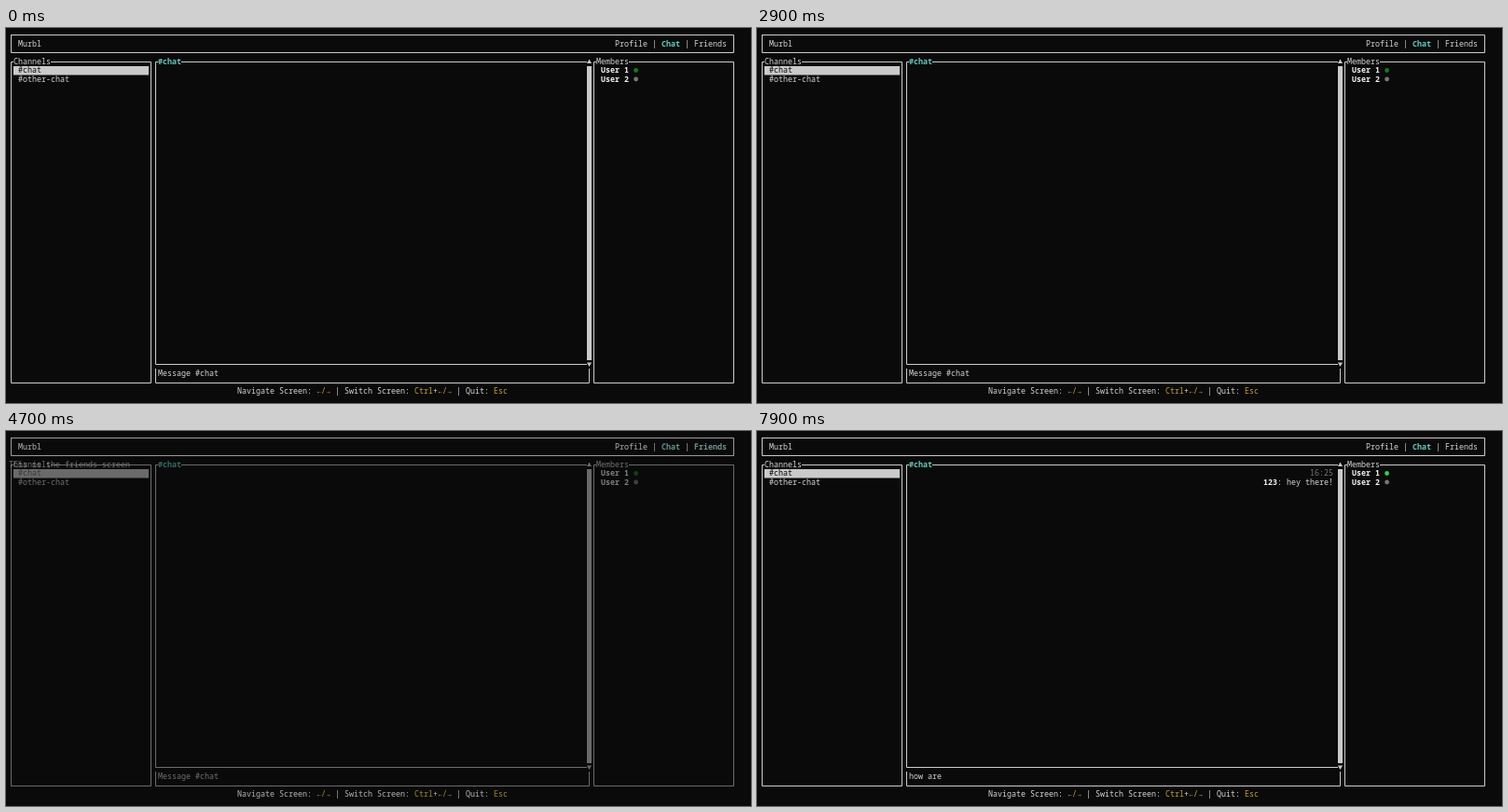
Recreate the animation shown at these times as an HTML page with a canvas. Size 799 by 403 pixels, loop 8 s.

```html
<!DOCTYPE html>
<html lang="en">
<head>
<meta charset="utf-8">
<title>Terminal chat</title>
<style>
  html, body { margin: 0; width: 100%; height: 100%; overflow: hidden; background: #0a0a0a; }
  canvas { display: block; }
</style>
</head>
<body>
<canvas id="stage" width="799" height="403"></canvas>
<script>
const ctx = document.getElementById('stage').getContext('2d');
const LOOP = 8000, CELL = 5, ROW = 9.585;
const BG = '#0a0a0a', FG = '#d6d6d6', LINE = '#cccccc', TEAL = '#68c9c0',
      GOLD = '#c4a044', GRAY = '#767676', WHITE = '#f2f2f2';

// Screen changes: [start, screen]
const screens = [[0, 'Chat'], [2000, 'Profile'], [2900, 'Chat'], [3800, 'Friends'], [4700, 'Chat']];
// Moments where the old and new picture mix for 100 ms
const mixes = [2000, 4700, 6400];
// Typing: text, start, end, characters present after each 100 ms step
const typing = [
  { text: 'hey there!', from: 5500, to: 6400, counts: [1, 3, 5, 6, 8, 9, 10] },
  { text: 'how are', from: 7500, to: LOOP, counts: [1, 3, 4, 5, 7] }
];
// Spans in which the online dot is bright
const bright = [[500, 2000], [3300, 3800], [5300, LOOP]];

function text(str, x, row, color = FG, bold = false) {
  ctx.font = `${bold ? 700 : 400} 8.333px "Noto Sans Mono", "DejaVu Sans Mono", monospace`;
  ctx.fillStyle = color;
  ctx.fillText(str, x, 19.5 + (row - 1) * ROW);
  return x + str.length * CELL;
}

function rect(x, y, w, h, color = LINE) {
  ctx.fillStyle = color;
  ctx.fillRect(x, y, w, h);
}

function path(points, close) {
  ctx.beginPath();
  points.forEach(([x, y]) => ctx.lineTo(x, y));
  if (close) {
    ctx.fillStyle = LINE;
    ctx.fill();
  } else {
    ctx.strokeStyle = LINE;
    ctx.lineWidth = 1;
    ctx.stroke();
  }
}

// Panel outline with a title set into its top edge
function panel(x, right, bottom, title, color, bold) {
  const gap = x + 2.5, end = gap + title.length * CELL;
  path([[gap, 36.5], [x, 36.5], [x, bottom], [right, bottom], [right, 36.5], [end, 36.5]]);
  text(title, gap, 3, color, bold);
}

function dot(y, color) {
  ctx.beginPath();
  ctx.arc(675.6, y, 2.4, 0, 7);
  ctx.fillStyle = color;
  ctx.fill();
}

function header(screen) {
  path([[5.5, 7], [5.5, 26.5], [780.5, 26.5], [780.5, 7.5], [5.5, 7.5]]);
  text('Murbl', 13, 1);
  let x = 653;
  ['Profile', 'Chat', 'Friends'].forEach((name, i) => {
    if (i) x = text(' | ', x, 1);
    const on = name === screen;
    x = text(name, x, 1, on ? TEAL : FG, on);
  });
}

function footer() {
  let x = 248;
  [['Navigate Screen: '], ['←/→', GOLD], [' | Switch Screen: '], ['Ctrl', GOLD], ['+'],
   ['←/→', GOLD], [' | Quit: '], ['Esc', GOLD]].forEach(([s, c]) => x = text(s, x, 40, c));
}

function chat(t) {
  panel(5.5, 155.5, 381.5, 'Channels');
  rect(8, 41, 145, 9.5, '#cacaca');
  text('#chat', 13, 4, BG);
  text('#other-chat', 13, 5);

  panel(630.5, 780.5, 381.5, 'Members');
  text('User 1', 638, 4, WHITE, true);
  text('User 2', 638, 5, WHITE, true);
  dot(45.5, bright.some(([a, b]) => t >= a && t < b) ? '#2fd052' : '#14791f');
  dot(55, GRAY);

  // Message list with scrollbar
  path([[188, 36.5], [623, 36.5]]);
  path([[163, 36.5], [160.5, 36.5], [160.5, 361.5], [623, 361.5]]);
  text('#chat', 163, 3, TEAL, true);
  rect(623, 41, 5, 316, '#cacaca');
  path([[623, 38], [625.5, 33.5], [628, 38]], true);
  path([[623, 359.5], [625.5, 364], [628, 359.5]], true);
  if (t >= 6400) {
    text('16:25', 593, 4, GRAY);
    text(': hey there!', text('123', 543, 5, WHITE, true), 5);
  }

  // Input
  path([[160.5, 366], [160.5, 381.5], [625.5, 381.5], [625.5, 366]]);
  const typed = typing.find(p => t >= p.from && t < p.to);
  let input = 'Message #chat';
  if (typed) {
    const step = Math.min(Math.floor((t - typed.from) / 100), typed.counts.length - 1);
    input = typed.text.slice(0, typed.counts[step]);
  }
  text(input, 163, 38);
}

function draw(t, alpha = 1) {
  ctx.globalAlpha = alpha;
  rect(0, 0, 799, 403, BG);
  const screen = screens.filter(([start]) => t >= start).pop()[1];
  header(screen);
  if (screen === 'Chat') chat(t);
  else text(`This is the ${screen.toLowerCase()} screen`, 3, 3);
  footer();
}

function frame(now) {
  const t = now % LOOP;
  const mix = mixes.find(m => t >= m && t < m + 100);
  if (mix) draw(mix - 1);
  draw(t, mix ? 0.5 : 1);
  requestAnimationFrame(frame);
}
requestAnimationFrame(frame);
</script>
</body>
</html>
```
